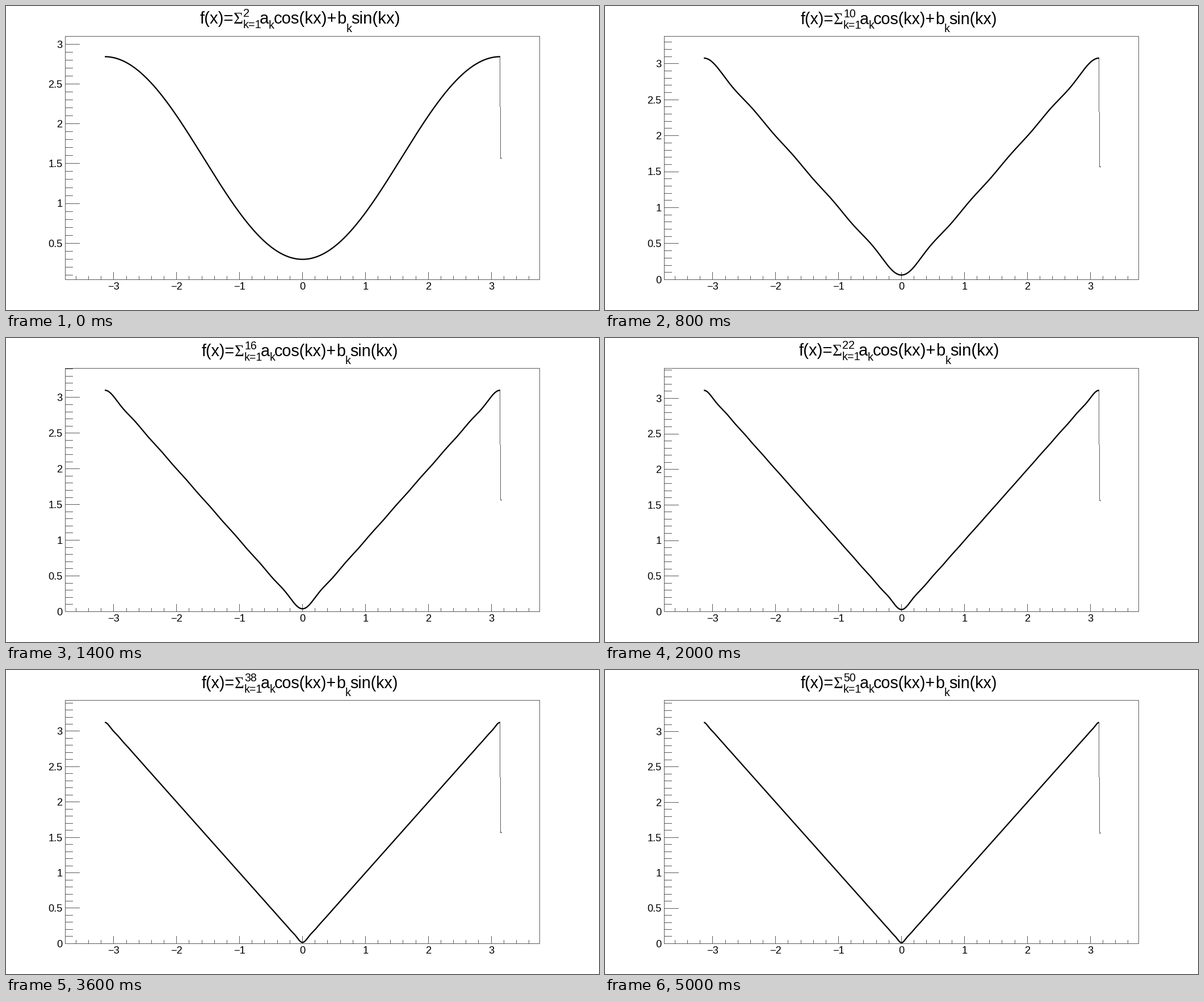
A matplotlib script that plays this animation: 1045 by 536 pixels, repeating every 5.1 s.

```python
import numpy as np
import matplotlib.pyplot as plt
from matplotlib.animation import FuncAnimation

W, H, DPI = 1045, 536, 100
PX = 72 / DPI                       # points per pixel
L, R, T, B = 0.1 * W, 0.9 * W, 0.1 * H, 0.9 * H
X_MAX = 1.2 * np.pi
LABEL = 18.3
LAST_ORDER = 50
THIN = "#5a5a5a"

plt.rcParams["font.family"] = "Liberation Sans"

fig = plt.figure(figsize=(W / DPI, H / DPI), dpi=DPI, facecolor="white")
ax = fig.add_axes([0, 0, 1, 1])
ax.set_xlim(0, W)
ax.set_ylim(H, 0)
ax.axis("off")


def mid(v):
    """Centre of the pixel that holds v."""
    return np.floor(v + 1e-6) + 0.5


def thin_line(x=(), y=()):
    return ax.plot(x, y, color=THIN, lw=PX, solid_capstyle="butt",
                   solid_joinstyle="miter", snap=False)[0]


def label(x, y, s="", size=LABEL, **kw):
    return ax.text(x, y, s, fontsize=size * PX, color="black",
                   va="baseline", **kw)


def to_x(v):
    return L + (v + X_MAX) * (R - L) / (2 * X_MAX)


# Frame and horizontal axis
left, right, top, bottom = mid(L), mid(R), mid(T), mid(B)
thin_line([left, right, right, left, left], [top, top, bottom, bottom, top])
for i in range(-18, 19):
    x = mid(to_x(i / 5))
    size = 0.03 * (B - T) * (1 if i % 5 == 0 else 0.5)
    thin_line([x, x], [bottom - 0.5, bottom - 0.5 - np.round(size)])
    if i % 5 == 0:
        label(to_x(i / 5), 500, str(i // 5).replace("-", "\u2212"), ha="center")

# Parts that change with the order of the sum
ticks = thin_line()
drop = thin_line()
curve, = ax.plot([], [], color="black", lw=2.3 * PX, solid_capstyle="butt")
end_dot, = ax.plot([], [], "s", color="black", ms=1.6 * PX, mew=0, snap=False)
y_labels = [label(99.5, 0, ha="right") for _ in range(7)]

# Title pieces: text, relative size, level, advance in em
SANS, SERIF = "Liberation Sans", "Liberation Serif"
SMALL = 0.68
PIECES = [
    ("f(x)=", 1, "main", 2.028, SANS),
    ("\u03a3", 1, "main", 0.592, SERIF),
    ("", SMALL, "sup", 0, SANS),
    ("k=1", SMALL, "sub", 0.984, SANS),
    ("a", 1, "main", 0.556, SANS),
    ("k", SMALL, "sub_a", 0.3, SANS),
    ("cos(kx)+", 1, "main", 3.806, SANS),
    ("b", 1, "main", 0.556, SANS),
    ("k", SMALL, "sub_b", 0.3, SANS),
    ("sin(kx)", 1, "main", 2.944, SANS),
]
TITLE_EM = sum(p[3] for p in PIECES)
LEVELS = {"main": 31.6, "sup": 19.6, "sub": 39.6, "sub_a": 40.4, "sub_b": 46.2}
title = [label(0, 0, p[0], family=p[4]) for p in PIECES]

xs = np.linspace(-np.pi, np.pi, 1500)


def series(x, order):
    k = np.arange(1, order + 1, 2)[:, None]
    return np.pi / 2 - 4 / np.pi * (np.cos(k * x) / k**2).sum(axis=0)


def draw_title(order):
    # Digits with a round foot make the title a little smaller
    wide = order % 10 in (2, 4)
    em, shift = (29.3, -0.7) if wide else (28.7, 0)
    x = 518 - TITLE_EM * em / 2
    for text, (_, scale, level, advance, _) in zip(title, PIECES):
        text.set_position((x, LEVELS[level] + shift))
        text.set_fontsize(em * scale * PX)
        if level == "sup":
            text.set_text(str(order))
        x += advance * em


def draw(i):
    order = min(LAST_ORDER, 2 + 2 * (i // 2))
    ys = series(xs, order)
    margin = 0.1 * (ys.max() - ys.min())
    low, high = max(0, ys.min() - margin), ys.max() + margin

    def to_y(v):
        return B - (v - low) * (B - T) / (high - low)

    curve.set_data(to_x(xs), to_y(ys))

    # The closing point falls back to the mean value
    x_end, y_top, y_end = mid(to_x(np.pi)), to_y(ys[-1]), to_y(np.pi / 2)
    y_half = np.floor((y_top + y_end) / 2)
    drop.set_data([x_end, x_end, np.nan, x_end + 1, x_end + 1],
                  [y_top, y_half, np.nan, y_half, y_end])
    end_dot.set_data([x_end + 1], [y_end])

    tx, ty, majors = [], [], []
    for n in range(int(np.ceil(low * 10)), int(high * 10) + 1):
        y = mid(to_y(n / 10))
        major = n % 5 == 0
        size = 0.03 * (R - L) * (1 if major else 0.5)
        tx += [left + 0.5, left + 0.5 + np.round(size), np.nan]
        ty += [y, y, np.nan]
        if major:
            majors.append(n / 10)
    ticks.set_data(tx, ty)

    for text in y_labels:
        text.set_text("")
    for text, v in zip(y_labels, majors):
        text.set_text(f"{v:g}")
        text.set_y(to_y(v) + 6.4)

    draw_title(order)
    return [curve, drop, end_dot, ticks, *y_labels, *title]


anim = FuncAnimation(fig, draw, frames=51, interval=100, repeat=True,
                     repeat_delay=0, blit=False)
plt.show()
```
